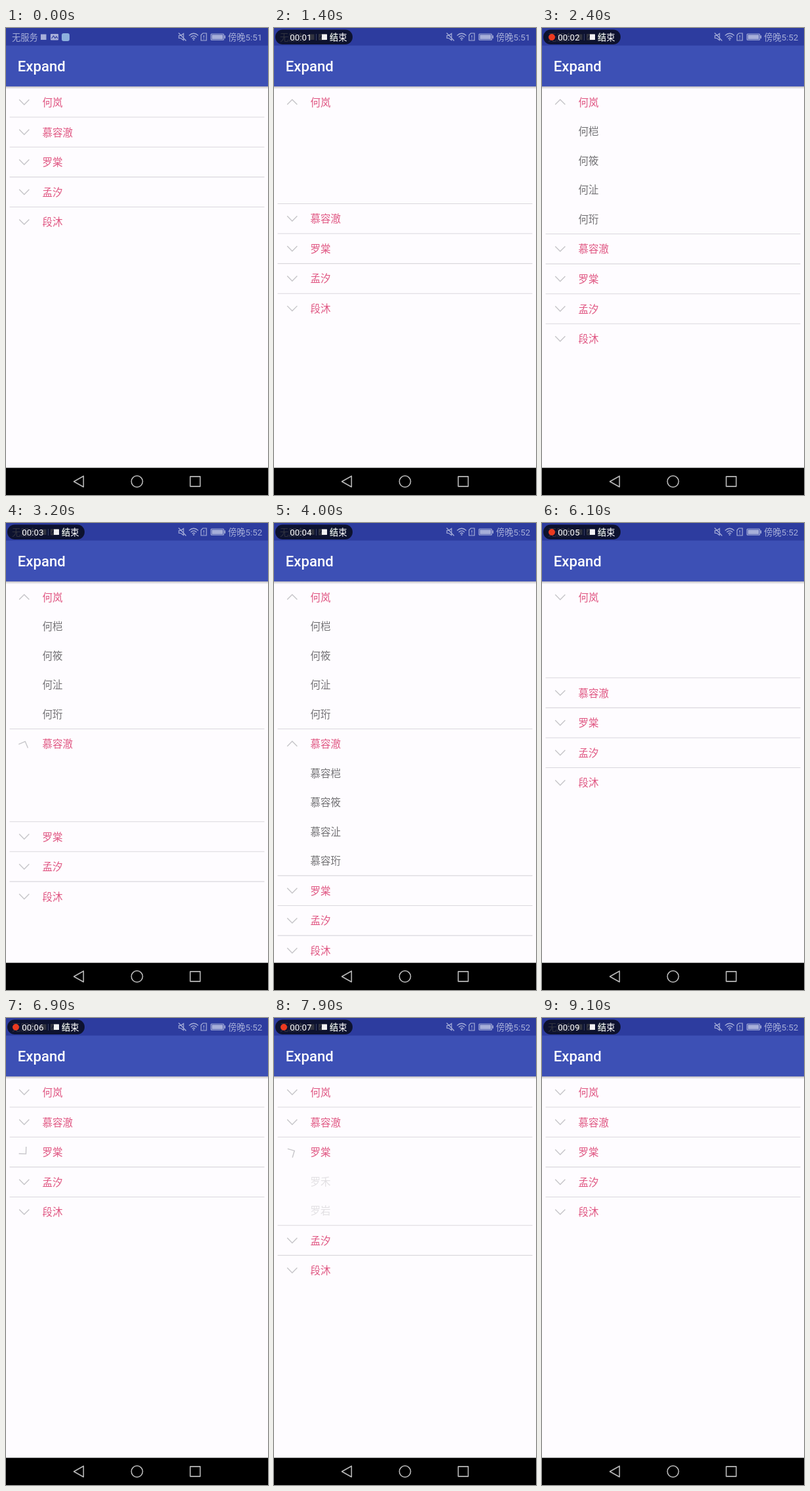
An HTML page that plays this animation: 400x711 px, repeating every 9.5 s.

```html
<!DOCTYPE html>
<html lang="zh-CN">
<head>
<meta charset="utf-8">
<title>Expand</title>
<style>
  html, body { margin: 0; width: 100%; height: 100%; overflow: hidden; background: #fefcff; }
  svg { display: block; width: 100%; height: 100%; }
  text { font-family: Roboto, "Noto Sans CJK SC", "Noto Sans CJK", sans-serif; white-space: pre; }
  .small { font-size: 13.3px; }
  .row { font-size: 15.5px; }
  .head { fill: #e05783; }
  .kid { fill: #727174; }
  .arrow { fill: none; stroke: #c6c5c9; stroke-width: 1.4; }
  .rule { stroke: #dad8dd; stroke-width: 1.1; }
  .line { fill: none; stroke: #a7afd9; stroke-width: 1.2; }
  .nav { fill: none; stroke: #b9b9b9; stroke-width: 1.6; stroke-linejoin: round; }
</style>
</head>
<body>
<svg id="stage" viewBox="0 0 400 711" preserveAspectRatio="none">
  <defs>
    <linearGradient id="shade" x1="0" y1="0" x2="0" y2="1">
      <stop offset="0" stop-color="#000" stop-opacity=".3"/>
      <stop offset="1" stop-color="#000" stop-opacity="0"/>
    </linearGradient>
  </defs>
  <rect width="400" height="711" fill="#fefcff"/>
  <g id="list"></g>

  <rect y="88" width="400" height="5" fill="url(#shade)"/>
  <rect y="26" width="400" height="62.9" fill="#3d50b5"/>
  <rect width="400" height="26.7" fill="#2d3c9f"/>
  <text x="17.8" y="66.3" font-size="22.2" font-weight="500" fill="#fff">Expand</text>

  <g fill="#a7afd9">
    <text class="small" x="9" y="18.6">无服务</text>
    <rect x="53" y="9.5" width="8.5" height="8.5"/>
    <rect x="68" y="9" width="12" height="9.5" rx="1"/>
    <path d="M69.5 16 L72.5 12 L75 15.5 L77 13 L79 16" fill="none" stroke="#2d3c9f" stroke-width="1.2"/>
    <rect x="85" y="8" width="12" height="12" rx="3" fill="#8db1dd"/>

    <path class="line" d="M264 11.5 h2.8 l4.2 -3 v10 l-4.2 -3 h-2.8 z M263.5 7.5 L275 19.5"/>
    <path class="line" d="M279.5 11.5 Q286.5 5 293.5 11.5 M282 14 Q286.5 9.7 291 14 M284.3 16.3 Q286.5 14.2 288.7 16.3"/>
    <circle cx="286.5" cy="18" r="1.1"/>
    <path class="line" d="M300.5 8 H306 V19 H297.8 V10.8 Z M302 11 V14.8 M302 16 V17.3"/>
    <rect class="line" x="313" y="9" width="19.4" height="9.2" rx="1"/>
    <rect x="314.3" y="10.3" width="16.8" height="6.6"/>
    <rect x="333.4" y="11.3" width="1.6" height="4.6"/>
    <text id="clock" class="small" x="339" y="18.6"></text>
  </g>

  <g id="pill">
    <rect x="2" y="2.5" width="118" height="22.5" rx="11.2" fill="#000" fill-opacity=".7"/>
    <circle id="dot" cx="15" cy="14" r="5" fill="#ea3a20"/>
    <text id="timer" class="small" x="24.3" y="18.6" fill="#fff"></text>
    <path d="M64.5 9 V19" stroke="#3a4268"/>
    <rect x="73" y="9.5" width="8" height="8.5" fill="#f1f1f4"/>
    <text class="small" x="85" y="18.6" fill="#fff">结束</text>
  </g>

  <rect y="669.6" width="400" height="41.4" fill="#000"/>
  <path class="nav" d="M103.6 690.5 L118.3 682.2 V698.8 Z"/>
  <circle class="nav" cx="200" cy="690.4" r="8.6"/>
  <rect class="nav" x="281.3" y="682.9" width="15.2" height="15"/>
</svg>

<script>
const LOOP = 9500, STEP = 100;
const ROW = 45.6, KID = 44.45, TOP = 113;
const SPIN = 500, MOVE = 500, FADE = 240, OPEN_LAG = 177, CLOSE_LAG = 390;

// open and close: start times in ms
const groups = [
  { name: "何岚", kids: ["何桤", "何筱", "何沚", "何珩"], open: 893, close: 5480 },
  { name: "慕容澈", kids: ["慕容桤", "慕容筱", "慕容沚", "慕容珩"], open: 2761, close: 4476 },
  { name: "罗棠", kids: ["罗禾", "罗岩"], open: 6780, close: 7730 },
  { name: "孟汐", kids: [] },
  { name: "段沐", kids: [] }
];
const ticks = [950, 1900, 2950, 3900, 5050, 6150, 7050, 8000, 9000];
const blinks = [400, 1500, 2400, 3450, 4500, 5500, 6500, 7500, 8500];

const $ = id => document.getElementById(id);
const part = (t, start, span) => Math.min(1, Math.max(0, (t - start) / span));
const ease = x => 0.5 - 0.5 * Math.cos(Math.PI * x);
const passed = (times, t) => times.filter(s => t >= s).length;

function add(parent, tag, attrs, text) {
  const el = document.createElementNS("http://www.w3.org/2000/svg", tag);
  for (const key in attrs) el.setAttribute(key, attrs[key]);
  if (text) el.textContent = text;
  return parent.appendChild(el);
}

function build(g, i) {
  g.el = add($("list"), "g", {});
  if (i) add(g.el, "path", { class: "rule", d: "M5.5 -22.9 H394.5" });
  g.arrow = add(g.el, "path", { class: "arrow", d: "M-7.6 -3.8 L0 3.9 L7.6 -3.8" });
  add(g.el, "text", { class: "row head", x: 55.6, y: 5.9 }, g.name);
  g.box = add(g.el, "g", {});
  g.kids.forEach((kid, k) =>
    add(g.box, "text", { class: "row kid", x: 55.6, y: 5.9 + KID * (k + 1) }, kid));
}

// size: open share of the height; turn: degrees; alpha: child opacity
function pose(g, t) {
  if (!g.kids.length || t < g.open) return { size: 0, turn: 0, alpha: 0 };
  if (t < g.close) {
    return {
      size: ease(part(t, g.open + OPEN_LAG, MOVE)),
      turn: 360 - 180 * part(t, g.open, SPIN),
      alpha: part(t, g.open + OPEN_LAG + MOVE, FADE)
    };
  }
  return {
    size: 1 - ease(part(t, g.close + CLOSE_LAG, MOVE)),
    turn: 180 + 180 * part(t, g.close, SPIN),
    alpha: 1 - ease(part(t, g.close, FADE))
  };
}

function draw(t) {
  let y = TOP;
  for (const g of groups) {
    const p = pose(g, t);
    g.el.setAttribute("transform", `translate(0 ${y.toFixed(2)})`);
    g.arrow.setAttribute("transform", `translate(27.8 -.2) rotate(${p.turn.toFixed(2)})`);
    g.box.setAttribute("opacity", p.alpha.toFixed(3));
    y += ROW + p.size * KID * g.kids.length;
  }
  const secs = passed(ticks, t);
  $("pill").style.display = t < 100 ? "none" : "";
  $("dot").style.display = passed(blinks, t) > secs ? "" : "none";
  $("timer").textContent = "00:0" + secs;
  $("clock").textContent = t < 1600 ? "傍晚5:51" : "傍晚5:52";
}

groups.forEach(build);
const begin = performance.now();
function frame() {
  const t = (performance.now() - begin) % LOOP;
  draw(Math.floor(t / STEP) * STEP);
  requestAnimationFrame(frame);
}
draw(0);
requestAnimationFrame(frame);
</script>
</body>
</html>
```
